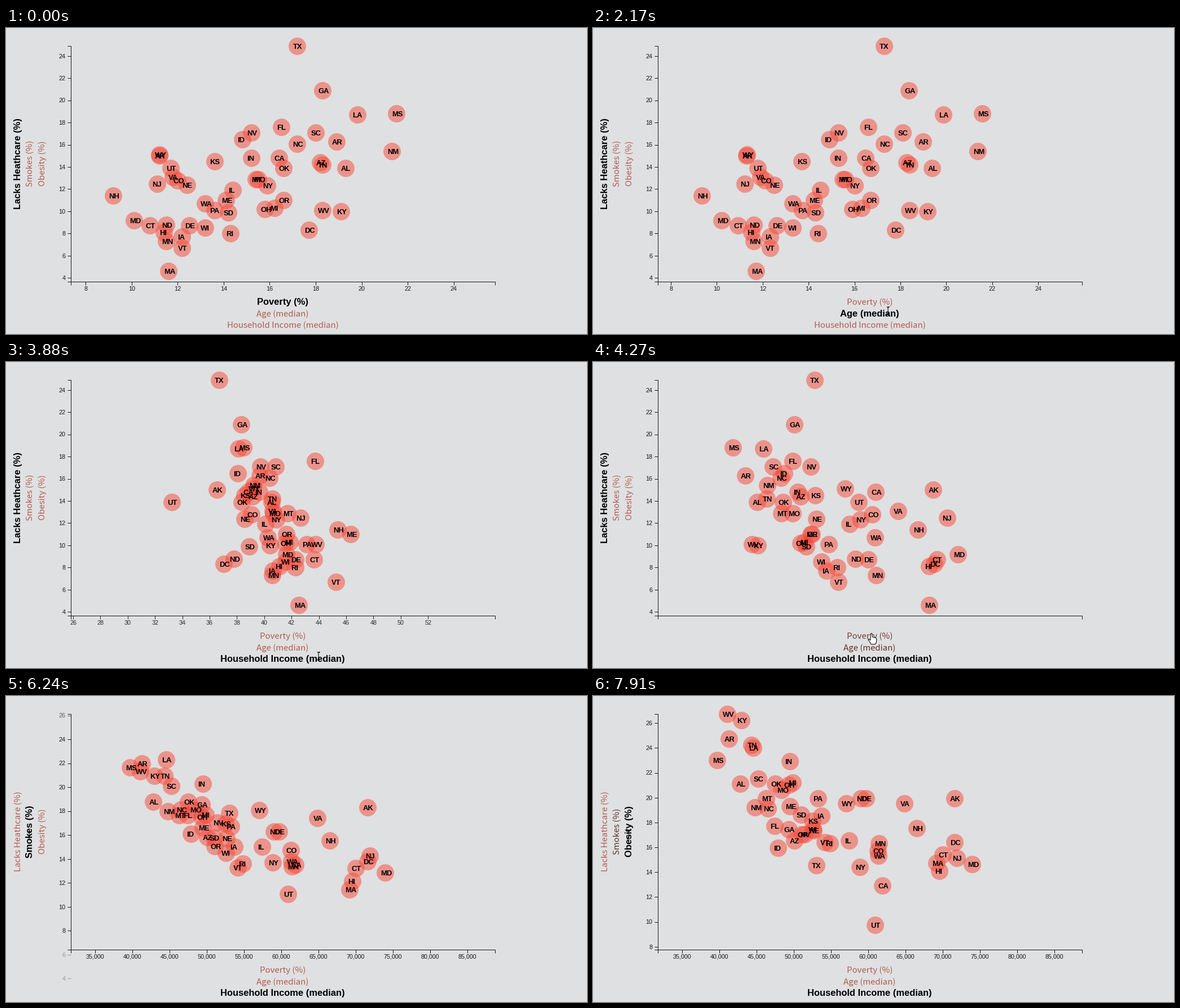
Recreate the animation shown at these times as a matplotlib script. Size 1030 by 544 pixels, loop 7990 ms.

```python
import numpy as np
import matplotlib.pyplot as plt
from matplotlib.animation import FuncAnimation
from matplotlib.patches import Polygon, Rectangle

W, H, DPI = 1030, 544, 100
STEP, FRAMES = 47, 170
PX = 72 / DPI
BG, INK = "#dfe0e1", "#15171a"
DOT = (246 / 255, 72 / 255, 54 / 255, 0.5)
FADED = np.array([178, 92, 80]) / 255

STATES = (
    "AL AK AZ AR CA CO CT DE DC FL GA HI ID IL IN IA KS KY LA ME MD MA MI MN MS MO "
    "MT NE NV NH NJ NM NY NC ND OH OK OR PA RI SC SD TN TX UT VT VA WA WV WI WY"
).split()

DATA = {
    "poverty": [
        19.3, 11.2, 18.2, 18.9, 16.4, 12, 10.8, 12.5, 17.7, 16.5, 18.3, 11.4, 14.8,
        14.4, 15.2, 12.2, 13.6, 19.1, 19.8, 14.1, 10.1, 11.6, 16.2, 11.5, 21.5, 15.5,
        15.4, 12.4, 15.2, 9.2, 11.1, 21.3, 15.9, 17.2, 11.5, 15.8, 16.6, 16.6, 13.6,
        14.3, 18, 14.2, 18.3, 17.2, 11.7, 12.2, 11.8, 13.2, 18.3, 13.2, 11.2],
    "age": [
        38.6, 33.3, 36.9, 37.8, 36, 36.3, 40.5, 39.6, 33.8, 41.6, 36.1, 38, 35.9,
        37.5, 37.4, 38.2, 36.2, 38.5, 36.1, 44.1, 38.3, 39.4, 39.6, 37.8, 36.7, 38.5,
        39.6, 36.2, 37.4, 42.4, 39.4, 37.2, 38.2, 38.3, 35.1, 39.3, 36.2, 39.3, 40.7,
        39.8, 38.8, 36.6, 38.6, 34.3, 30.5, 42.8, 37.7, 37.5, 41.9, 39.2, 36.6],
    "income": [
        42830, 71583, 50068, 41262, 61933, 61303, 70048, 59716, 71648, 47463, 49321,
        69592, 47861, 57444, 49446, 53712, 52504, 42958, 44555, 49462, 73971, 69160,
        49847, 61481, 39680, 48363, 46328, 52686, 51450, 66532, 71919, 44803, 58878,
        46556, 59029, 49308, 47529, 51075, 53234, 54891, 45238, 50979, 44361, 53035,
        60922, 54166, 64902, 61366, 41059, 52622, 57055],
    "care": [
        13.9, 15, 14.4, 16.3, 14.8, 12.8, 8.7, 8.7, 8.3, 17.6, 20.9, 8.1, 16.5,
        11.9, 14.8, 7.7, 14.5, 10, 18.7, 11, 9.2, 4.6, 10.3, 7.3, 18.8, 12.9,
        12.9, 12.4, 17.1, 11.4, 12.5, 15.4, 12.3, 16.1, 8.8, 10.2, 13.9, 11, 10.1,
        8, 17.1, 9.9, 14.2, 24.9, 13.9, 6.7, 13.1, 10.7, 10.1, 8.5, 15.1],
    "smokes": [
        21.1, 19.9, 16.5, 24.7, 12.9, 15.7, 15.4, 19.9, 16.4, 17.7, 17.4, 14.1, 15.9,
        16.5, 22.9, 18.5, 18.1, 26.2, 24, 19.3, 14.6, 14.7, 21.2, 16.3, 23, 20.6,
        19.9, 17.3, 17, 17.5, 15.1, 19.2, 14.4, 19.1, 19.9, 21, 21.1, 17, 19.9,
        16.3, 21.5, 18.6, 24.2, 14.5, 9.7, 16.4, 19.5, 15.3, 26.7, 17.4, 19.5],
    "obesity": [
        33.5, 29.7, 28.9, 35.9, 24.7, 21.3, 26.3, 30.7, 21.7, 26.2, 30.5, 22.1, 28.9,
        29.3, 32.7, 30.9, 31.3, 31.6, 34.9, 28.2, 29.6, 23.3, 30.7, 27.6, 35.5, 30.2,
        26.4, 30.2, 27.7, 27.4, 26.9, 28.4, 27, 29.7, 32.2, 32.6, 33, 27.9, 30.2,
        27, 32.1, 29.8, 31.2, 31.9, 25.7, 24.8, 28.5, 27.3, 35.7, 31.2, 29.5],
}
DATA = {key: np.array(values, float) for key, values in DATA.items()}

# plot box: left, right, bottom, top
X0, X1, Y0, Y1 = 115, 867.3, 450.5, 32
START = {"x": "poverty", "y": "care"}
# click time, start of the move, axis, new metric
CLICKS = [
    (2000, 2072, "x", "age"),
    (3570, 3620, "x", "income"),
    (5700, 5709, "y", "smokes"),
    (7830, 7830, "y", "obesity"),
]
MOVE = 925


def domain(axis, key):
    values = DATA[key]
    return values.min() * 0.8, values.max() * (1.2 if axis == "x" else 1)


def scale(axis, key, value):
    lo, hi = domain(axis, key)
    a, b = (X0, X1) if axis == "x" else (Y0, Y1)
    return a + (np.asarray(value) - lo) / (hi - lo) * (b - a)


def tick_values(axis, key):
    lo, hi = domain(axis, key)
    step = 5000 if key == "income" else 2
    return range(int(np.ceil(lo / step)) * step, int(hi) + 1, step)


def ease(u):
    u = min(max(u, 0), 1)
    return 4 * u ** 3 if u < 0.5 else 1 - 4 * (1 - u) ** 3


def transition(axis, t):
    """Previous metric, current metric and eased progress between them."""
    old = new = START[axis]
    p = 1
    for _, start, which, key in CLICKS:
        if which == axis and t >= start:
            old, new, p = new, key, ease((t - start) / MOVE)
    return old, new, p


def active(axis, t):
    key = START[axis]
    for click, _, which, nxt in CLICKS:
        if which == axis and t >= click:
            key = nxt
    return key


fig = plt.figure(figsize=(W / DPI, H / DPI), dpi=DPI, facecolor=BG)
ax = fig.add_axes([0, 0, 1, 1])
ax.set_xlim(0, W)
ax.set_ylim(H, 0)
ax.axis("off")
view = Rectangle((8, 6), 901, 528, fc="none", ec="none")
ax.add_patch(view)


def add_text(x, y, s, size, ha="left", **kw):
    text = ax.text(x, y, s, fontsize=size * PX, ha=ha, va="baseline", **kw)
    text.set_clip_path(view)
    return text


def add_line(xs, ys, color=INK, width=1, **kw):
    return ax.plot(xs, ys, color=color, lw=width * PX, solid_capstyle="butt",
                   solid_joinstyle="miter", **kw)[0]


add_line([X0, X0, X1, X1], [Y0 + 6, Y0, Y0, Y0 + 6], zorder=2)
add_line([X0 - 6, X0, X0, X0 - 6], [Y0, Y0, Y1, Y1], zorder=2)


class Ticks:
    def __init__(self, axis, count=36):
        self.axis = axis
        ha = "center" if axis == "x" else "right"
        self.marks = [add_line([], [], zorder=2) for _ in range(count)]
        self.texts = [add_text(0, 0, "", 10.7, ha, color=INK, zorder=2,
                               family="Liberation Sans") for _ in range(count)]
        for mark in self.marks:
            mark.set_clip_path(view)

    def shown(self, t):
        old, new, p = transition(self.axis, t)
        before = set(tick_values(self.axis, old))
        after = set(tick_values(self.axis, new))
        lo, hi = (8, 930) if self.axis == "x" else (2, 540)
        for v in sorted(before | after):
            a, b = scale(self.axis, old, v), scale(self.axis, new, v)
            pos = a + (b - a) * p
            alpha = 1 if v in before & after else p if v in after else 1 - p
            if alpha > 0.004 and lo < pos < hi:
                yield v, pos, alpha

    def draw(self, t):
        shown = list(self.shown(t))
        for i, (mark, text) in enumerate(zip(self.marks, self.texts)):
            on = i < len(shown)
            mark.set_visible(on)
            text.set_visible(on)
            if not on:
                continue
            v, pos, alpha = shown[i]
            if self.axis == "x":
                mark.set_data([pos, pos], [Y0, Y0 + 6])
                text.set_position((pos, 467))
            else:
                mark.set_data([X0 - 6, X0], [pos, pos])
                text.set_position((105.5, pos + 3.8))
            text.set_text(f"{v:,}")
            mark.set_alpha(alpha)
            text.set_alpha(alpha)


class Label:
    """Clickable axis title; box is its hover area."""

    def __init__(self, axis, key, words, base, box):
        self.axis, self.key, self.box = axis, key, box
        x, y, turn = (490.5, base, 0) if axis == "x" else (base, 241, 90)
        self.text = add_text(x, y, words, 15, "center", rotation=turn,
                             rotation_mode="anchor", zorder=3)

    def hit(self, x, y):
        left, top, right, bottom = self.box
        return left <= x <= right and top <= y <= bottom

    def dark(self, t):
        point = cursor_at(t)
        return active(self.axis, t) == self.key or (point is not None and self.hit(*point))

    def draw(self, t):
        text = self.text
        if active(self.axis, t) == self.key:
            text.set(family="Liberation Sans", weight="bold", fontsize=16.5 * PX, color="black")
        else:
            share = np.mean([self.dark(t - 20 * k) for k in range(9)])
            text.set(family="Noto Sans CJK JP", weight="light", fontsize=15 * PX,
                     color=tuple(FADED * (1 - share)))


labels = [
    Label("x", "poverty", "Poverty (%)", 492, (446, 479, 536, 494)),
    Label("x", "age", "Age (median)", 513, (438, 500, 543.5, 516)),
    Label("x", "income", "Household Income (median)", 533.5, (380, 519, 602, 534)),
    Label("y", "care", "Lacks Heathcare (%)", 26.5, (14, 162, 29, 320)),
    Label("y", "smokes", "Smokes (%)", 47.5, (35, 200, 50, 282)),
    Label("y", "obesity", "Obesity (%)", 68.5, (55, 200, 71, 282)),
]

# pointer path: time, x, y
PATH = np.array([
    (290, 905, 540), (680, 690, 512), (1070, 558, 492), (1150, 556, 497), (1450, 523, 502),
    (2300, 523, 503), (2690, 545, 505), (2870, 545, 505), (3190, 554, 522),
    (4080, 554, 523), (4430, 430, 440), (4900, 150, 275), (5150, 51, 244),
    (5300, 50, 246), (5460, 41, 248), (6900, 41, 248), (7360, 62, 249), (7990, 63, 247),
])


def cursor_at(t):
    if t < PATH[0, 0]:
        return None
    return tuple(np.interp(t, PATH[:, 0], PATH[:, i]) for i in (1, 2))


ARROW = np.array([(0, 0), (0, 14.5), (3.3, 11.4), (5.4, 16.3), (7.4, 15.4),
                  (5.4, 10.7), (9.6, 10.5)])
HAND = np.array([(-1.5, 0), (1, 0), (1.5, 6), (8, 8), (9, 10), (8.5, 15), (7, 19),
                 (-1, 19), (-3, 15), (-6, 11), (-5, 9.5), (-1.8, 12)])
BEAM = np.array([(-2.5, -7), (0, -6.5), (2.5, -7), (0, -6.5), (0, 6.5),
                 (-2.5, 7), (0, 6.5), (2.5, 7)])


def add_shape(points):
    shape = Polygon(points, fc="white", ec="black", lw=PX, zorder=9)
    return ax.add_patch(shape)


arrow, hand = add_shape(ARROW), add_shape(HAND)
beam = add_line([], [], "black", zorder=9)


def draw_cursor(t):
    point = cursor_at(t)
    kind = None
    if point:
        over = [lab for lab in labels if lab.hit(*point)]
        kind = arrow
        if over:
            kind = beam if active(over[0].axis, t) == over[0].key else hand
    for shape in (arrow, hand, beam):
        shape.set_visible(shape is kind)
    if kind is arrow:
        arrow.set_xy(ARROW + point)
    elif kind is hand:
        hand.set_xy(HAND + point)
    elif kind is beam:
        beam.set_data(*(BEAM + point).T)


dots = ax.scatter(np.zeros(len(STATES)), np.zeros(len(STATES)), s=(31 * PX) ** 2,
                  color=[DOT], linewidths=0, zorder=4)
names = [add_text(0, 0, s, 13, color="black", weight="bold", zorder=5,
                  family="Liberation Sans") for s in STATES]
ticks = [Ticks("x"), Ticks("y")]


def place(axis, t):
    old, new, p = transition(axis, t)
    a, b = (scale(axis, key, DATA[key]) for key in (old, new))
    return a + (b - a) * p


def draw(i):
    t = i * STEP + 20
    xs, ys = place("x", t), place("y", t)
    dots.set_offsets(np.column_stack([xs, ys]))
    for name, x, y in zip(names, xs, ys):
        name.set_position((x - 8, y + 5))
    for part in ticks + labels:
        part.draw(t)
    draw_cursor(t)
    return []


anim = FuncAnimation(fig, draw, frames=FRAMES, interval=STEP, repeat=True,
                     repeat_delay=0, blit=False)
plt.show()
```
